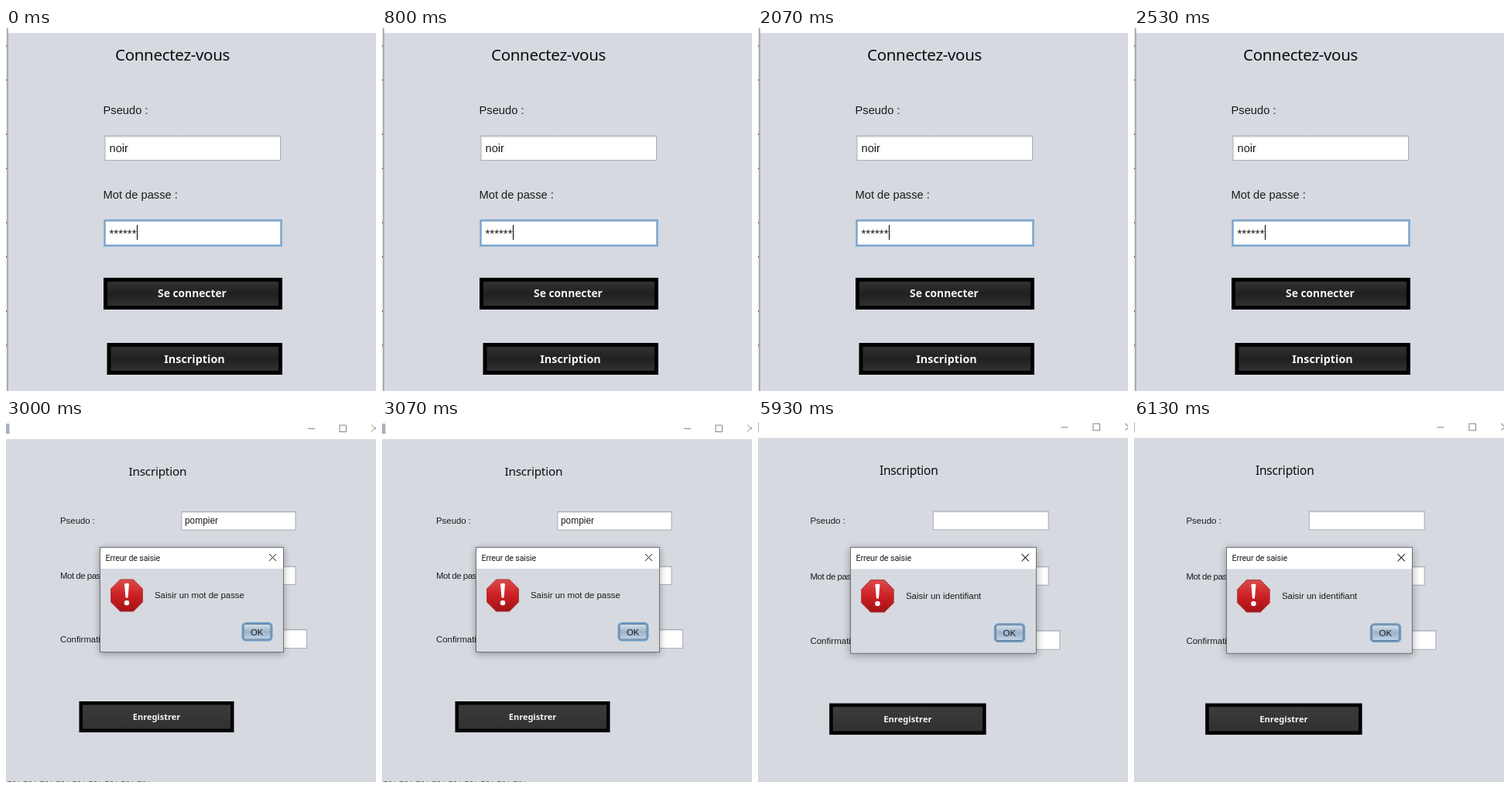
Animation of 478x468 px, one loop 8 s. Source, as an HTML page:

```html
<!DOCTYPE html>
<html lang="fr">
<head>
<meta charset="utf-8">
<title>Connexion et inscription</title>
<style>
html, body { margin: 0; width: 100%; height: 100%; overflow: hidden; background: #d6d9df; }
svg { display: block; width: 100vw; height: 100vh; }
text { font-family: "Liberation Sans", Arial, sans-serif; fill: #1c1c1e; }
.title { font-family: "Noto Sans", "Open Sans", sans-serif; fill: #0c0c0e; letter-spacing: -.015em; }
.label { font-size: 14.7px; }
.small { font-size: 11.4px; }
.tight { letter-spacing: -.04em; }
.caption { font-family: Roboto, sans-serif; font-size: 10.7px; letter-spacing: -.015em; }
.action { font-family: "Noto Sans", "Open Sans", sans-serif; font-weight: 700; fill: #f4f4f4; text-anchor: middle; }
.field { fill: url(#inset); stroke: #a9adb4; }
.button { fill: url(#dark); stroke: #000; stroke-width: 5; }
.glyph { fill: none; stroke: #858585; }

.scene { visibility: hidden; animation: 8s step-end infinite; }
.login { animation-name: login; }
.password { animation-name: password; }
.username { animation-name: username; }
@keyframes login { 0% { visibility: visible; } 37.5%, 100% { visibility: hidden; } }
@keyframes password { 0% { visibility: hidden; } 37.5% { visibility: visible; } 74.125%, 100% { visibility: hidden; } }
@keyframes username { 0% { visibility: hidden; } 74.125%, 100% { visibility: visible; } }
</style>
</head>
<body>
<svg viewBox="0 0 478 468" preserveAspectRatio="none">
  <defs>
    <linearGradient id="inset" x2="0" y2="1">
      <stop offset="0" stop-color="#cfd1d5"/>
      <stop offset=".1" stop-color="#fff"/>
    </linearGradient>
    <linearGradient id="dark" x2="0" y2="1">
      <stop offset="0" stop-color="#343434"/>
      <stop offset=".5" stop-color="#202020"/>
      <stop offset="1" stop-color="#333"/>
    </linearGradient>
    <linearGradient id="grey" x2="0" y2="1">
      <stop offset="0" stop-color="#3c3c3c"/>
      <stop offset="1" stop-color="#303030"/>
    </linearGradient>
    <linearGradient id="red" x2="0" y2="1">
      <stop offset="0" stop-color="#dc4b4b"/>
      <stop offset=".5" stop-color="#cc2024"/>
      <stop offset="1" stop-color="#a31216"/>
    </linearGradient>
    <linearGradient id="blue" x2="0" y2="1">
      <stop offset="0" stop-color="#dfe8f1"/>
      <stop offset=".5" stop-color="#9db3c9"/>
      <stop offset="1" stop-color="#c3d9ee"/>
    </linearGradient>
    <filter id="soft" x="-20%" y="-20%" width="140%" height="140%">
      <feGaussianBlur stdDeviation="5"/>
    </filter>

    <g id="form">
      <rect width="490" height="480" fill="#d6d9df"/>
      <rect width="490" height="26" fill="#fff"/>
      <rect x="-1" y="6" width="5.5" height="13" fill="#a9b1bd"/>
      <path class="glyph" d="M390 12.5h9M431 8h8.500v8.500h-8.500zM472 7.500l9 9m0-9l-9 9"/>
      <text class="title" x="158.500" y="73" font-size="15.300">Inscription</text>
      <text class="small" x="70" y="135">Pseudo :</text>
      <text class="small tight" x="70" y="206">Mot de passe :</text>
      <text class="small" x="70" y="288">Confirmation :</text>
      <rect class="field" x="227" y="119.500" width="147" height="23.500"/>
      <rect class="field" x="227" y="190" width="147" height="23.500"/>
      <rect class="field" x="241" y="271.500" width="147.500" height="24"/>
      <rect class="button" x="96.750" y="366.250" width="195.500" height="35.500" style="fill:url(#grey);stroke-width:4.5"/>
      <text class="action" x="194.500" y="388" font-size="11">Enregistrer</text>

      <rect x="121" y="167" width="238" height="136" opacity=".32" filter="url(#soft)"/>
      <rect x="121.500" y="165.500" width="237" height="135" fill="#d6d9df" stroke="#6d7077"/>
      <rect x="122" y="166" width="236" height="27" fill="#fff"/>
      <text class="caption" x="128.500" y="183">Erreur de saisie</text>
      <path class="glyph" style="stroke:#222" d="M340 174l9 9m0-9l-9 9"/>
      <path d="M147.500 207h17l12 12v17l-12 12h-17l-12-12v-17z" fill="url(#red)" stroke="#a83a3d" stroke-linejoin="round"/>
      <path d="M153 212.500q3-1.500 6 0l-1.500 18h-3z" fill="#fff"/>
      <circle cx="156" cy="237" r="3.200" fill="#fff"/>
      <rect x="305.500" y="263" width="38" height="22.500" rx="4.500" fill="url(#blue)" stroke="#6d9bc4" stroke-width="2"/>
      <rect x="307" y="264.500" width="35" height="19.500" rx="3" fill="none" stroke="#5f7890"/>
      <text x="316" y="279" font-size="11.400">OK</text>
    </g>
  </defs>

  <g class="scene login">
    <rect width="478" height="468" fill="#d6d9df"/>
    <rect width="478" height="6.500" fill="#fff"/>
    <rect width="2" height="468" fill="#e9e9ea"/>
    <path d="M.5 22v446" stroke="#666" stroke-dasharray="2 42 2 68"/>
    <path d="M2 0v468" stroke="#74767b"/>
    <text class="title" x="141" y="42" font-size="20.500">Connectez-vous</text>
    <text class="label" x="125.500" y="111">Pseudo :</text>
    <rect class="field" x="128" y="139" width="226.500" height="31.500"/>
    <text class="label" x="133.500" y="160">noir</text>
    <text class="label" x="125.500" y="220">Mot de passe :</text>
    <rect class="field" x="127.500" y="248" width="228" height="32.500" style="stroke:#7ba5d0;stroke-width:2.500"/>
    <text x="133.500" y="270" font-size="15">******</text>
    <path d="M169.500 254v19" stroke="#000"/>
    <rect class="button" x="128.500" y="324.500" width="226" height="36"/>
    <text class="action" x="240.500" y="347" font-size="13.800">Se connecter</text>
    <rect class="button" x="133" y="408.500" width="221.500" height="36"/>
    <text class="action" x="243.500" y="432" font-size="14.400">Inscription</text>
  </g>

  <g class="scene password">
    <use href="#form"/>
    <text x="231" y="135" font-size="11.900">pompier</text>
    <text class="small" x="192" y="231">Saisir un mot de passe</text>
    <path d="M2 467.500h186" stroke="#666" stroke-dasharray="5 2 3 4 1 6"/>
  </g>

  <g class="scene username" transform="translate(-3.5 -2) scale(1.0125)">
    <use href="#form"/>
    <text class="small" x="192" y="231">Saisir un identifiant</text>
  </g>
</svg>
</body>
</html>
```
